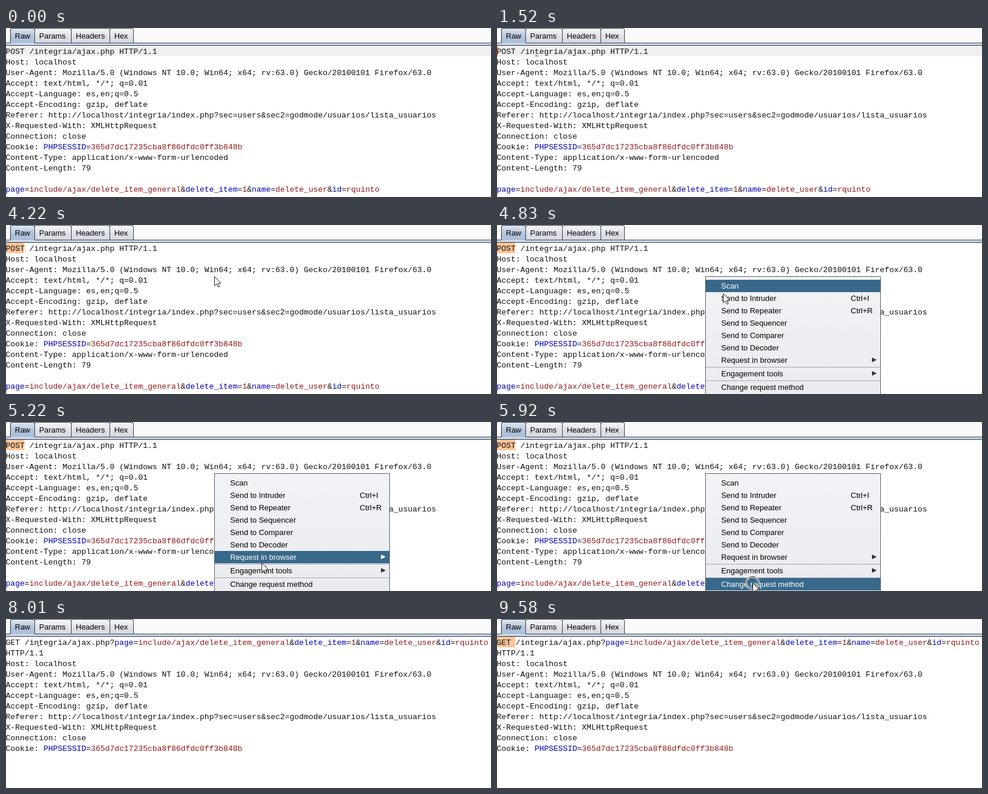
Animation, 820 px wide and 287 px high, one loop 9810 ms. Source, as an HTML page:

```html
<!DOCTYPE html>
<html lang="en">
<head>
<meta charset="utf-8">
<title>Request editor</title>
<style>
html, body { margin: 0; width: 100%; height: 100%; overflow: hidden; background: #fff; }
#stage { position: relative; width: 820px; height: 287px; overflow: hidden; background: #fff;
  font: 13px/20px "Liberation Sans", Arial, sans-serif; color: #000; }
#stage div, pre, svg { position: absolute; box-sizing: border-box; }
pre { left: -.5px; top: 32px; margin: 0; color: #111;
  font: 13.333px/18px "Liberation Mono", "Courier New", monospace; }
pre i { font-style: normal; color: #0000b0; }
pre b { font-weight: normal; color: #921616; }
#strip { left: 0; top: 0; width: 820px; height: 25px; background: #fafafa; }
#band { left: 0; top: 25px; width: 820px; height: 5px; background: #d3dfec;
  border-top: 1px solid #2f3d5a; border-bottom: 1px solid #1f2c46; }
.tab { top: 0; height: 26px; padding: 3px 0 0 7px; border: 1px solid #3a3f4e; border-radius: 4px 4px 0 0;
  border-bottom-color: #2f3d5a; background: linear-gradient(#f6f7f9, #dfe1e6 55%, #d6d9e0); }
.tab.on { border-color: #222c44; border-bottom-color: #b4c8df;
  background: linear-gradient(#dfe6f1, #b4c4da 55%, #a9bfda); }
#row { left: 0; top: 30px; width: 820px; height: 18px; background: #f0f0f0; }
#sel { top: 30px; height: 18px; background: #ffc599; }
#caret { left: 0; top: 31px; width: 1px; height: 17px; background: #ff3c00; }
#menu { left: 352px; top: 87px; width: 297px; height: 210px; border: 1px solid #5c6068;
  background: linear-gradient(#f2f3f6, #eaebef); }
.item { left: 0; width: 295px; height: 21px; padding-left: 26px; line-height: 21px; white-space: pre; }
.item.on { background: #39698a; color: #fff; }
.item span { position: absolute; left: 245px; }
.item .sub::after { content: ""; position: absolute; left: 36px; top: 6px;
  border: solid transparent; border-width: 4.5px 0 4.5px 8px; border-left-color: #333; }
.item.on .sub::after { border-left-color: #fff; }
.rule { left: 0; width: 295px; height: 1px; background: #a3a7ae; }
svg { left: 0; top: 0; }
</style>
</head>
<body>
<div id="stage">
  <div id="strip"></div>
  <div id="band"></div>
  <div id="row"></div>
  <div id="sel"></div>
  <pre id="text"></pre>
  <div id="caret"></div>
  <div id="menu"></div>
  <svg width="820" height="287">
    <g id="mouse">
      <g id="ring" fill="none">
        <circle r="10.5" stroke="#fff" stroke-width="3"/>
        <circle r="10.5" stroke="#000"/>
      </g>
      <path id="beam" d="M-1 5h3v1h-3zM3 5h1v1h-1z"/>
      <path id="arrow" d="M.5 .5V16.3L4.2 12.8L6.8 18.5L9.2 17.4L6.7 11.9H11.6Z" fill="#fff" stroke="#222"/>
    </g>
  </svg>
</div>
<script>
const LOOP = 9810;
const $ = id => document.getElementById(id);
const stage = $("stage"), menu = $("menu");

function add(parent, cls, css, html = "") {
  const el = document.createElement("div");
  el.className = cls;
  Object.assign(el.style, css);
  el.innerHTML = html;
  parent.append(el);
  return el;
}

// Tabs
[["Raw", 7, 42], ["Params", 48, 63], ["Headers", 110, 66], ["Hex", 175, 41]].forEach(([name, x, w], i) =>
  stage.insertBefore(add(stage, i ? "tab" : "tab on", { left: x + "px", width: w + "px" }, name), $("row")));

// Request texts
const pair = ([name, value]) => `<i>${name}</i>=<b>${value}</b>`;
const query = [
  ["page", "include/ajax/delete_item_general"], ["delete_item", "1"],
  ["name", "delete_user"], ["id", "rquinto"]
].map(pair).join("&amp;");
const headers = `Host: localhost
User-Agent: Mozilla/5.0 (Windows NT 10.0; Win64; x64; rv:63.0) Gecko/20100101 Firefox/63.0
Accept: text/html, */*; q=0.01
Accept-Language: es,en;q=0.5
Accept-Encoding: gzip, deflate
Referer: http://localhost/integria/index.php?sec=users&amp;sec2=godmode/usuarios/lista_usuarios
X-Requested-With: XMLHttpRequest
Connection: close
Cookie: ${pair(["PHPSESSID", "365d7dc17235cba8f86dfdc0ff3b848b"])}`;
const post = `POST /integria/ajax.php HTTP/1.1
${headers}
Content-Type: application/x-www-form-urlencoded
Content-Length: 79

${query}`;
const get = `GET /integria/ajax.php?${query}
HTTP/1.1
${headers}`;

// Context menu
const sub = '<span class="sub"></span>';
const items = [
  ["Scan", 5], ["Send to Intruder<span>Ctrl+I</span>", 26], ["Send to Repeater<span>Ctrl+R</span>", 47],
  ["Send to Sequencer", 68], ["Send to Comparer", 89], ["Send to Decoder", 110],
  ["Request in browser" + sub, 131], ["Engagement tools" + sub, 154], ["Change request method", 177]
].map(([html, y]) => add(menu, "item", { top: y + "px" }, html));
[153, 176].forEach(y => add(menu, "rule", { top: y + "px" }));
const hoverTimes = [4700, 4910, 4960, 5010, 5060, 5100, 5140, 5330, 5430];

// Pointer path: time, x, y
const path = [
  [290, 633, 271], [1210, 168, 70], [1520, 66, 42], [1600, 66, 42], [2060, 110, 40],
  [2210, 110, 40], [2400, 247, 40], [2540, 33, 38], [2790, 4, 36], [3300, 4, 36],
  [3990, 352, 90], [4140, 352, 87], [4680, 352, 87], [4830, 382, 116], [4910, 382, 116],
  [5220, 432, 239], [5300, 432, 239], [5530, 432, 273], [6380, 432, 273], [7310, 808, 46],
  [7380, 808, 46], [8080, 33, 40], [8340, 4, 38], [8880, 7, 38], [9180, 592, 290]
];
function pointer(t) {
  const i = path.findIndex(k => k[0] > t);
  if (i <= 0) return path[i ? path.length - 1 : 0].slice(1);
  const [t0, x0, y0] = path[i - 1], [t1, x1, y1] = path[i];
  const p = (t - t0) / (t1 - t0), e = p * p * (3 - 2 * p);
  return [Math.round(x0 + (x1 - x0) * e), Math.round(y0 + (y1 - y0) * e)];
}

const within = (t, a, b) => t >= a && t < b;
const show = (el, on) => { el.style.visibility = on ? "visible" : "hidden"; };
const blink = (t, start) => Math.floor((t - start) / 500) % 2 === 0;
let shown;

function draw(t) {
  const [x, y] = pointer(t);
  const body = t < 6150 ? post : get;
  if (body !== shown) $("text").innerHTML = shown = body;

  const first = within(t, 2540, 6150), second = t >= 8080;
  const dragging = within(t, 2540, 2790) || within(t, 8080, 8340);
  const left = dragging ? Math.min(31, Math.round(x / 8) * 8) : 0;
  show($("row"), t < 2540);
  show($("sel"), first || second);
  $("sel").style.left = left + "px";
  $("sel").style.width = 31 - left + "px";
  show($("caret"), within(t, 290, 4290) && blink(t, 290) || t >= 7080 && blink(t, 7080));

  const open = within(t, 4300, 6080);
  menu.style.display = open ? "block" : "none";
  const hover = hoverTimes.filter(h => h <= t).length - 1;
  items.forEach((el, i) => el.classList.toggle("on", i === hover));

  const arrow = within(t, 4140, 6080);
  $("mouse").setAttribute("transform", `translate(${x} ${y})`);
  show($("arrow"), arrow);
  show($("beam"), !arrow && within(t, 290, 9180));
  show($("ring"), within(t, 2540, 3300) || within(t, 5920, 6080) || within(t, 8080, 8640));
}

const start = performance.now();
function tick() {
  draw((performance.now() - start) % LOOP);
  requestAnimationFrame(tick);
}
tick();
</script>
</body>
</html>
```
